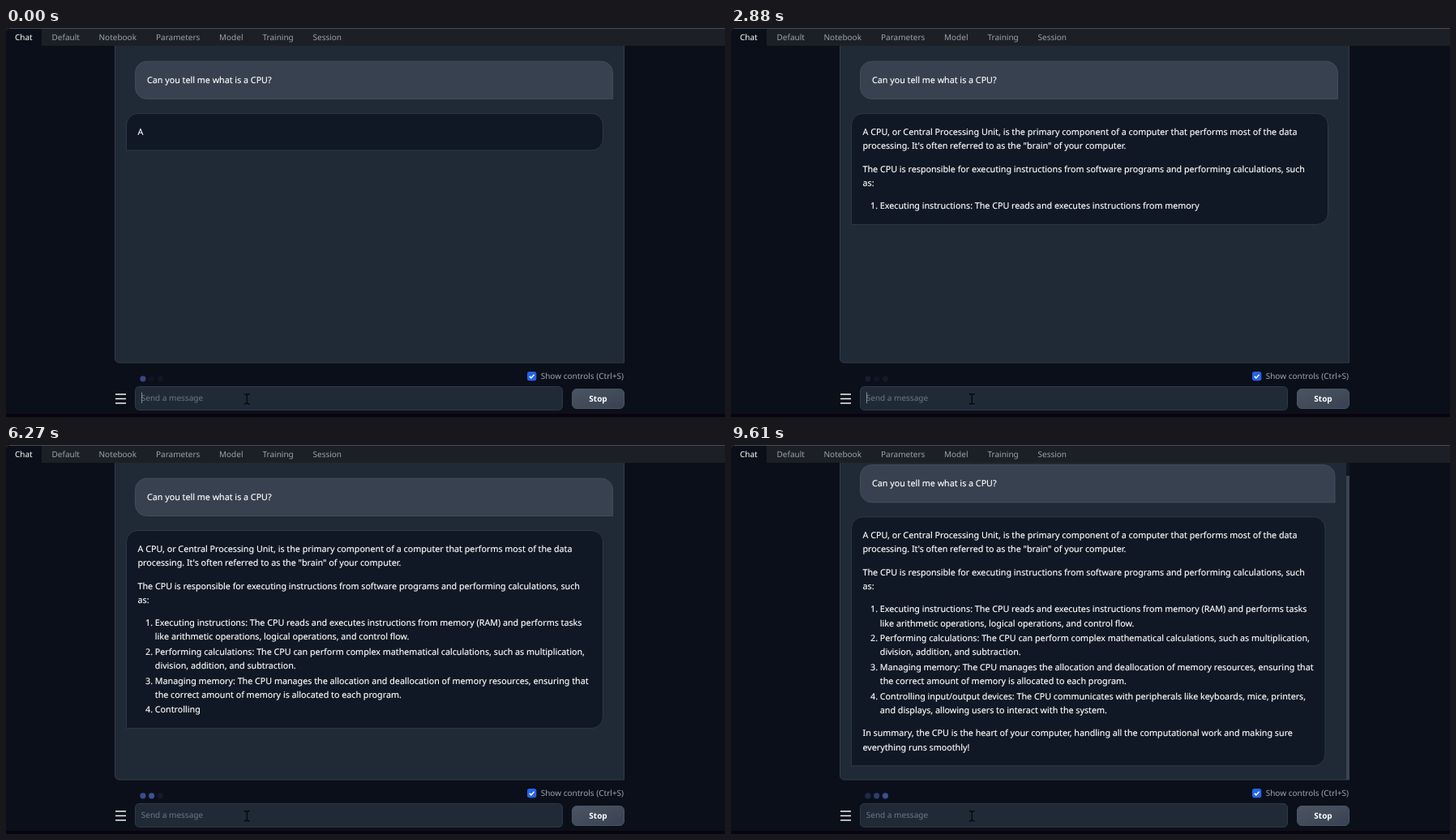
An HTML page for the animation above (9.64 s loop, 887 px wide and 480 px high).

```html
<!DOCTYPE html>
<html lang="en">
<head>
<meta charset="utf-8">
<title>Chat</title>
<style>
html, body { margin: 0; width: 100%; height: 100%; overflow: hidden; background: #0b0f19; }
svg { display: block; width: 100%; height: 100%; }
text {
  font: 10px "Noto Sans", sans-serif;
  text-rendering: geometricPrecision;
  fill: #9ca3af;
  white-space: pre;
}
#messages text { font-size: 10.72px; fill: #fff; stroke: #fff; stroke-width: .15px; }
</style>
</head>
<body>
<svg viewBox="0 0 887 480">
  <defs>
    <linearGradient id="button" x2="1" y2="1">
      <stop stop-color="#4b5563"/><stop offset="1" stop-color="#374151"/>
    </linearGradient>
  </defs>
  <rect width="887" height="480" fill="#0b0f19"/>
  <rect y="476" width="887" height="4" fill="#0a0410"/>

  <path d="M134.5 10V408a5 5 0 0 0 5 5H762.5V10z" fill="#202a36" stroke="#323c49"/>
  <g id="messages">
    <path id="question" fill="#38414f" stroke="#434c5a"/>
    <text x="174" y="68">Can you tell me what is a CPU?</text>
    <path id="answer" fill="#111825" stroke="#2d3846"/>
  </g>
  <g id="scrollbar">
    <rect x="759" y="22" width="4" height="391" fill="#111722"/>
    <rect x="759" y="38" width="4" height="375" fill="#3a4452"/>
  </g>

  <g id="tabs">
    <rect width="887" height="22" fill="#1c1f25"/>
    <path d="M0 22V6a5 5 0 0 1 5-5H44V22z" fill="#0b0f19"/>
    <rect x="4" width="883" height="1" fill="#484b51"/>
  </g>

  <g id="dots" fill="#3f5397">
    <circle cx="168.9" cy="432.8" r="3.6"/>
    <circle cx="179.6" cy="432.8" r="3.6"/>
    <circle cx="190.4" cy="432.8" r="3.6"/>
  </g>

  <rect x="643" y="424" width="11.3" height="11.3" rx="2.8" fill="#2563eb"/>
  <path d="M645.8 429.9l2 2 3.8-4.2" fill="none" stroke="#fff" stroke-width="1.5"/>
  <text x="659.7" y="433">Show controls (Ctrl+S)</text>

  <path d="M135 452h13M135 457.5h13M135 463h13" stroke="#f3f4f6" stroke-width="1.4"/>
  <rect x="159.5" y="442.5" width="527" height="29" rx="5" fill="#202a36" stroke="#2f3947"/>
  <text x="166.8" y="460" style="fill:#6f7885">Send a message</text>
  <rect id="caret" x="167" y="449.5" width=".8" height="13.5" fill="#9aa2ae"/>
  <path d="M293.8 451.7h2.2l1.2 1 1.2-1h2.2M297.2 452.5v10.5M293.8 463.8h2.2l1.2-1 1.2 1h2.2" fill="none" stroke="#05070b" stroke-width="1.4"/>

  <rect x="698.5" y="445.5" width="64" height="24" rx="5.5" fill="url(#button)" stroke="#4b5563"/>
  <text x="730.5" y="461" text-anchor="middle" style="fill:#fff;font-weight:600">Stop</text>
</svg>
<script>
const LOOP = 9640;
const $ = id => document.getElementById(id);

function addText(parent, x, y, content = "") {
  const node = document.createElementNS("http://www.w3.org/2000/svg", "text");
  node.setAttribute("x", x);
  node.setAttribute("y", y);
  node.textContent = content;
  parent.append(node);
  return node;
}

const tabs = { Chat: 11, Default: 56.5, Notebook: 114.5, Parameters: 185, Model: 263, Training: 316.5, Session: 378.5 };
for (const [name, x] of Object.entries(tabs)) {
  const label = addText($("tabs"), x, 15, name);
  if (name === "Chat") label.style.fill = "#fff";
}

// Each answer line: x, baseline, text.
const lines = [
  [162.5, 131.8, `A CPU, or Central Processing Unit, is the primary component of a computer that performs most of the data`],
  [162.5, 149, `processing. It's often referred to as the "brain" of your computer.`],
  [162.5, 177.5, `The CPU is responsible for executing instructions from software programs and performing calculations, such`],
  [162.5, 194.7, `as:`],
  [172, 223.2, `1. Executing instructions: The CPU reads and executes instructions from memory (RAM) and performs tasks`],
  [183.8, 240.4, `like arithmetic operations, logical operations, and control flow.`],
  [172, 258.9, `2. Performing calculations: The CPU can perform complex mathematical calculations, such as multiplication,`],
  [183.8, 276.1, `division, addition, and subtraction.`],
  [172, 294.7, `3. Managing memory: The CPU manages the allocation and deallocation of memory resources, ensuring that`],
  [183.8, 311.8, `the correct amount of memory is allocated to each program.`],
  [172, 330.4, `4. Controlling input/output devices: The CPU communicates with peripherals like keyboards, mice, printers,`],
  [183.8, 347.6, `and displays, allowing users to interact with the system.`],
  [162.5, 376.1, `In summary, the CPU is the heart of your computer, handling all the computational work and making sure`],
  [162.5, 393.3, `everything runs smoothly!`]
].map(([x, y, text]) => ({ y, text, node: addText($("messages"), x, y) }));

const answer = lines.map(line => line.text).join("\n");
const tokenEnds = [...answer.matchAll(/\d\. \w+|'s|\w+|[^\w\s]/g)].map(m => m.index + m[0].length);

// The pace of the stream: the phrase completed at each time.
const cues = [
  [0, "A"],
  [1900, "instructions from"],
  [3870, "Performing calculations: The"],
  [5320, "deallocation of memory"],
  [7440, "displays, allowing"],
  [8140, "summary, the CPU"],
  [9165, "smoothly!"]
].map(([time, phrase]) => {
  const end = answer.indexOf(phrase) + phrase.length;
  return { time, token: tokenEnds.findIndex(e => e >= end) };
});

function typedLength(t) {
  const next = cues.findIndex(cue => cue.time > t);
  if (next < 0) return answer.length;
  const a = cues[next - 1], b = cues[next];
  const token = a.token + (b.token - a.token) * (t - a.time) / (b.time - a.time);
  return tokenEnds[Math.floor(token + 1e-6)];
}

function bubble(l, t, r, b, bottomRight, bottomLeft) {
  const R = 14;
  const arc = (radius, dx, dy) => radius ? `a${radius} ${radius} 0 0 1 ${dx * radius} ${dy * radius}` : "";
  return `M${l + R} ${t}H${r - R}${arc(R, 1, 1)}V${b - bottomRight}${arc(bottomRight, -1, 1)}` +
    `H${l + bottomLeft}${arc(bottomLeft, -1, -1)}V${t + R}${arc(R, 1, -1)}z`;
}

// CSS "ease": cubic-bezier(.25, .1, .25, 1)
function ease(x) {
  let lo = 0, hi = 1;
  for (let i = 0; i < 20; i++) {
    const s = (lo + hi) / 2;
    const at = .75 * s * (1 - s) + s ** 3;
    if (at < x) lo = s; else hi = s;
  }
  return .3 * lo * (1 - lo) ** 2 + 3 * lo * lo * (1 - lo) + lo ** 3;
}

function dotOpacity(time) {
  const phase = (time + 1500) % 1500 / 1500;
  return phase < .2 ? .1 + .9 * ease(phase / .2) : 1 - .9 * ease((phase - .2) / .8);
}

const caretFlips = [500, 1700, 2980, 4150, 5150, 7000, 8400];

function draw(t) {
  let left = typedLength(t), bottom = 0;
  for (const { y, text, node } of lines) {
    const shown = text.slice(0, Math.max(0, left));
    if (node.textContent !== shown) node.textContent = shown;
    if (shown) bottom = y + 19.2;
    left -= text.length + 1;
  }

  const overflows = bottom > 400;
  const inset = overflows ? 3.5 : 0;
  $("question").setAttribute("d", bubble(159.5, 41.2, 748.5 - inset, 87.5, 0, 14));
  $("answer").setAttribute("d", bubble(148.5, 105.5, 736.5 - inset, bottom, 14, 0));
  $("messages").setAttribute("transform", `translate(0 ${overflows ? -16.7 : 0})`);
  $("scrollbar").style.opacity = +overflows;

  [...$("dots").children].forEach((dot, i) => {
    dot.style.opacity = dotOpacity(t + 155 - 200 * i);
  });
  $("caret").style.opacity = 1 - caretFlips.filter(flip => flip <= t).length % 2;
}

function tick() {
  draw(performance.now() % LOOP);
  requestAnimationFrame(tick);
}
tick();
</script>
</body>
</html>
```
